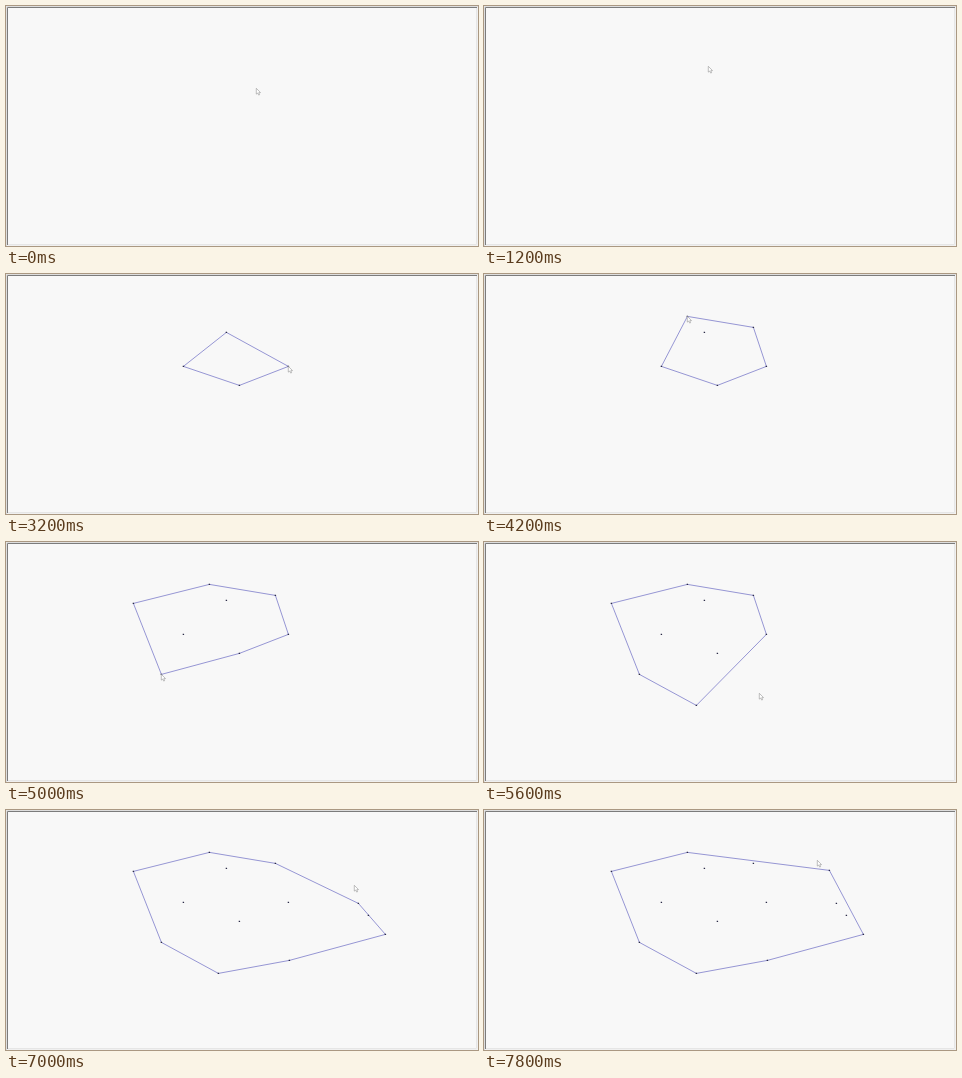
An HTML page that plays this animation: 472 by 240 pixels, repeating every 8000 ms.

```html
<!DOCTYPE html>
<html>
<head>
<meta charset="utf-8">
<title>Convex hull</title>
<style>
  html, body { margin: 0; width: 100%; height: 100%; overflow: hidden; background: #f8f8f8; }
  svg { display: block; }
</style>
</head>
<body>
<svg width="472" height="240" viewBox="0 0 472 240">
  <rect width="472" height="240" fill="#f8f8f8"/>
  <g fill="none" stroke-width="1">
    <path d="M471.5 0V239.5H0" stroke="#f0f0f0"/>
    <path d="M470.5 1V238.5H1" stroke="#e6e6e6"/>
    <path d="M0.5 240V0.5H472" stroke="#dedede"/>
    <path d="M1.5 239V1.5H471" stroke="#7c7c7c"/>
  </g>
  <path id="hull" fill="none" stroke="#5858bc" stroke-width="0.62" stroke-linejoin="round"/>
  <path id="dots" fill="#2c2c48"/>
  <path id="cursor" d="M0 0V5.8L1.4 4.7L2.4 6.8L3.3 6.4L2.5 4.3H4.2Z"
        fill="#fff" stroke="#949494" stroke-width="0.6"/>
</svg>
<script>
const LOOP = 8000, STEP = 200, TRAVEL = 600;

// Pointer path as [arrival time, x, y]; it clicks at every place but the first two and the last
const path = [
  [0, 250, 82], [600, 229, 62],
  [1600, 220, 58], [2400, 177, 92], [2800, 233, 111], [3200, 282, 92], [3800, 269, 53],
  [4200, 203, 42], [4600, 127, 61], [5000, 155, 132], [5200, 212, 163], [5800, 283, 150],
  [6200, 379, 124], [6600, 362, 105], [6800, 352, 93], [7400, 345, 60],
  [LOOP, 332, 49]
];
const clicks = path.slice(2, -1);

const hullEl = document.getElementById("hull");
const dotsEl = document.getElementById("dots");
const cursorEl = document.getElementById("cursor");

const easeOut = u => 1 - (1 - u) ** 2;
const cross = (o, a, b) => (a[0] - o[0]) * (b[1] - o[1]) - (a[1] - o[1]) * (b[0] - o[0]);

function chain(points) {
  const out = [];
  for (const p of points) {
    while (out.length > 1 && cross(out[out.length - 2], out[out.length - 1], p) <= 0) out.pop();
    out.push(p);
  }
  return out.slice(0, -1);
}

function convexHull(points) {
  const sorted = [...points].sort((a, b) => a[0] - b[0] || a[1] - b[1]);
  return [...chain(sorted), ...chain(sorted.reverse())];
}

// Rest at each place, then leave in time to reach the next
function pointerAt(t) {
  const i = path.findIndex(p => p[0] > t);
  const [t0, x0, y0] = path[i - 1], [t1, x1, y1] = path[i];
  const leave = Math.max(t0, t1 - TRAVEL);
  const u = easeOut(Math.max(0, (t - leave) / (t1 - leave)));
  return [x0 + (x1 - x0) * u, y0 + (y1 - y0) * u];
}

function render(t) {
  const points = clicks.filter(c => c[0] <= t).map(([, x, y]) => [x + 0.4, y + 0.4]);
  const outline = points.length > 1 ? convexHull(points) : [];
  hullEl.setAttribute("d", outline.length ? "M" + outline.join("L") + "Z" : "");
  dotsEl.setAttribute("d", points.map(([x, y]) => `M${x - 0.7} ${y - 0.6}h1.4v1.2h-1.4Z`).join(""));
  const [x, y] = pointerAt(t).map(Math.round);
  cursorEl.setAttribute("transform", `translate(${x + 0.3} ${y + 0.3})`);
}

const start = performance.now();
function tick() {
  const t = (performance.now() - start) % LOOP;
  render(Math.floor(t / STEP) * STEP);
  requestAnimationFrame(tick);
}
render(0);
requestAnimationFrame(tick);
</script>
</body>
</html>
```
